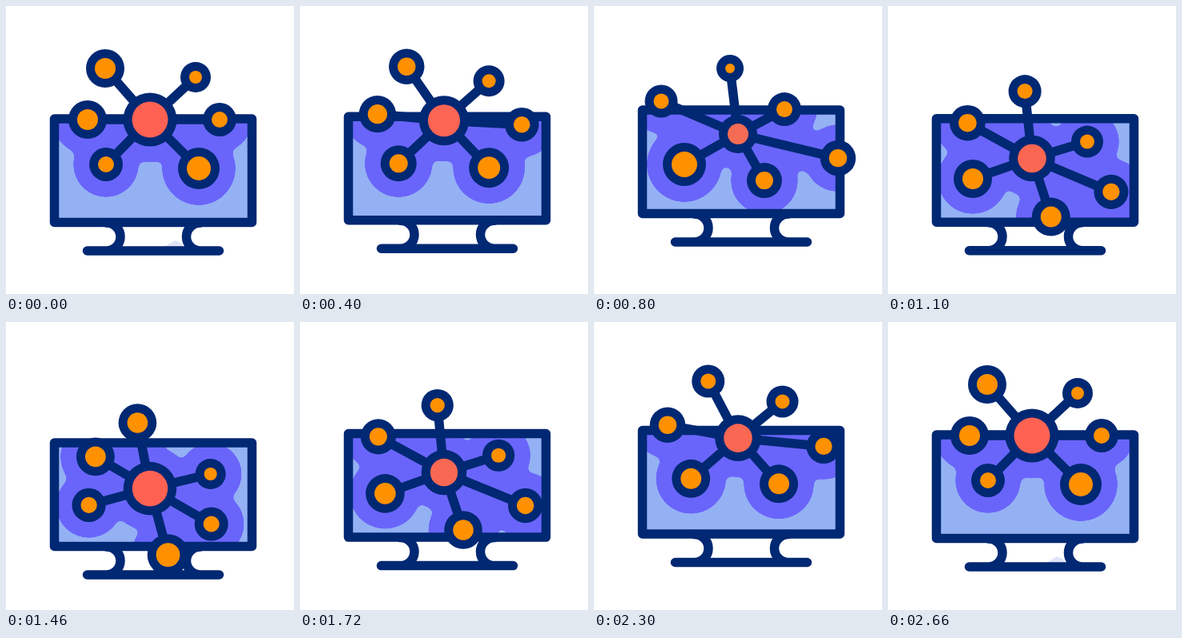
These frames come from a looping animation (360x360 px, 2820 ms). An HTML page:

```html
<!DOCTYPE html>
<html lang="en">
<head>
<meta charset="utf-8">
<title>Network monitor</title>
<style>
html, body { margin: 0; width: 100%; height: 100%; overflow: hidden; background: #fff; }
svg { display: block; width: 100vw; height: 100vh; }
</style>
</head>
<body>
<svg viewBox="0 0 360 360">
  <defs>
    <clipPath id="screen"><rect x="60" y="141" width="248" height="130"/></clipPath>
    <filter id="goo" filterUnits="userSpaceOnUse" x="-40" y="-40" width="440" height="440" color-interpolation-filters="sRGB">
      <feGaussianBlur stdDeviation="4.5"/>
      <feColorMatrix values="0 0 0 0 .416  0 0 0 0 .396  0 0 0 0 .98  0 0 0 22 -10.5"/>
    </filter>
  </defs>
  <g id="scene">
    <path id="sheen" d="M198 301L211 293Q219 295 222 301Z" fill="#dfe4f7"/>
    <rect x="60.5" y="141" width="247" height="130" fill="#94b1f4"/>
    <g clip-path="url(#screen)"><g id="halo" filter="url(#goo)" stroke="#6a65fa" fill="#6a65fa"></g></g>
    <g fill="none" stroke="#002873" stroke-width="11.5" stroke-linecap="round" stroke-linejoin="round">
      <rect x="60.5" y="141" width="247" height="129.5"/>
      <path d="M125.5 271a17.5 17.5 0 0 1 0 35M243 271a17.5 17.5 0 0 0 0 35M101.5 306H266.5"/>
    </g>
    <g id="net" stroke="#002873" fill="#002873"></g>
  </g>
</svg>
<script>
const REST = 200, TURN = 1400, LOOP = 2820;
const RING = 11, GLOW = 20, LINK = 11.5;

// Start, middle and end pose; the middle radius differs from both ends.
// Satellites are placed relative to the hub.
const hubPose = { x: [180, 180, 180], y: [142, 171, 198.5], r: [22.5, 13] };
const satPoses = [
  { x: [-56, -10, -16], y: [-64, -82, -82], r: [13, 6] },
  { x: [57, 58, 76], y: [-53, -31, -18], r: [8, 10] },
  { x: [87, 125, 75.5], y: [0, 30, 44.5], r: [10, 11.2] },
  { x: [61, 33, 22.5], y: [61, 58, 83.5], r: [15, 11] },
  { x: [-55, -67, -76.5], y: [56, 38, 20.5], r: [10, 16] },
  { x: [-78, -96, -67.5], y: [0, -41, -39.5], r: [13, 9.5] }
];

const byId = id => document.getElementById(id);
const scene = byId('scene'), halo = byId('halo'), net = byId('net'), sheen = byId('sheen');
const ease = u => (1 - Math.cos(Math.PI * u)) / 2;
const lerp = (a, b, k) => a + (b - a) * k;

function set(el, attrs) {
  for (const k in attrs) el.setAttribute(k, attrs[k]);
  return el;
}
function add(parent, tag, attrs) {
  return parent.appendChild(set(document.createElementNS('http://www.w3.org/2000/svg', tag), attrs));
}

const links = satPoses.map(() => [
  add(halo, 'line', { 'stroke-width': LINK + 2 * GLOW }),
  add(net, 'line', { 'stroke-width': LINK })
]);
const discs = [...satPoses, hubPose].map(() => [
  add(halo, 'circle', { stroke: 'none' }),
  add(net, 'circle', { stroke: 'none' }),
  add(net, 'circle', { stroke: 'none', fill: '#ff9100' })
]);
const hubCore = discs[discs.length - 1][2];

// Straight travel from start to end, plus a bulge through the middle pose.
function at([a, m, b], sweep, bulge) {
  return lerp(a, b, sweep) + (m - (a + b) / 2) * bulge;
}

function draw(t) {
  const there = t < TURN ? t : 2 * TURN - t;
  const u = Math.min(1, Math.max(0, (there - REST) / (TURN - REST)));
  const sweep = ease(u);
  const bulge = ease(u < 0.5 ? 2 * u : 2 - 2 * u);
  const lift = u < 0.5 ? -11 * bulge : lerp(10.5, -11, bulge);
  set(scene, { transform: `translate(0 ${lift})` });
  set(sheen, { opacity: u > 0 ? 0 : 1 });

  const place = p => ({
    x: at(p.x, sweep, bulge),
    y: at(p.y, sweep, bulge),
    r: lerp(p.r[0], p.r[1], bulge)
  });
  const hub = place(hubPose);
  const nodes = satPoses.map(p => {
    const n = place(p);
    return { x: hub.x + n.x, y: hub.y + n.y, r: n.r };
  });

  nodes.forEach((n, i) => {
    for (const line of links[i]) set(line, { x1: hub.x, y1: hub.y, x2: n.x, y2: n.y });
  });
  [...nodes, hub].forEach((n, i) => {
    [RING + GLOW, RING, 0].forEach((extra, j) =>
      set(discs[i][j], { cx: n.x, cy: n.y, r: n.r + extra }));
  });
  const tone = [[255, 245], [98, 108], [82, 84]].map(([a, b]) => Math.round(lerp(a, b, bulge)));
  set(hubCore, { fill: `rgb(${tone})` });
}

const start = performance.now();
function tick() {
  draw((performance.now() - start) % LOOP);
  requestAnimationFrame(tick);
}
tick();
</script>
</body>
</html>
```
